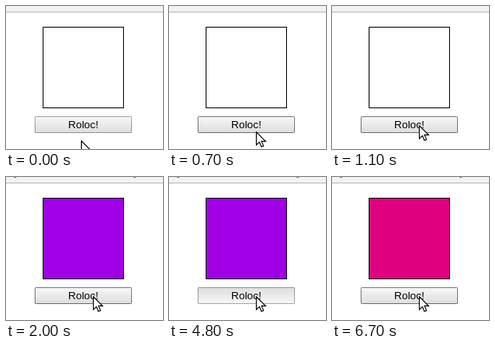
Write an HTML page that moves like this. It is 197 px wide and 179 px high and loops after 8000 ms.

```html
<!DOCTYPE html>
<html lang="en">
<head>
<meta charset="utf-8">
<title>Roloc</title>
<style>
  html, body { margin: 0; width: 100%; height: 100%; overflow: hidden; background: #fff; }
  svg { display: block; width: 100vw; height: 100vh; }
  text { font: 13.333px "Liberation Sans", Arial, sans-serif; }
</style>
</head>
<body>
<svg viewBox="0 0 197 179">
  <defs>
    <linearGradient id="raised" x1="0" y1="0" x2="0" y2="1">
      <stop offset="0" stop-color="#f8f8f8"/>
      <stop offset="1" stop-color="#ddd"/>
    </linearGradient>
    <linearGradient id="pressed" x1="0" y1="0" x2="0" y2="1">
      <stop offset="0" stop-color="#ddd"/>
      <stop offset="1" stop-color="#f8f8f8"/>
    </linearGradient>
  </defs>
  <rect width="197" height="179" fill="#fff"/>
  <rect width="197" height="7" fill="#f2f2f2"/>
  <rect y="7" width="197" height="1" fill="#b6b6b6"/>
  <path id="marks" d="M10 0h3v1h-3zM160 0h3v1h-3z" fill="#3a7fc4"/>
  <rect id="box" x="46.5" y="26.5" width="101" height="101" stroke="#000"/>
  <rect id="face" x="36" y="138" width="122" height="21" rx="1"/>
  <rect id="edge" x="36.5" y="138.5" width="121" height="20" rx="1" fill="none" stroke="#000"/>
  <text x="97" y="153" text-anchor="middle">Roloc!</text>
  <path id="cursor" d="M.6 .9V17L4.5 13.4L7 19.2L9.6 18.1L7.1 12.4H12.2Z"
        fill="#fff" stroke="#000" stroke-width="1.15"/>
</svg>
<script>
  const LOOP = 8000, STEP = 100;
  const $ = id => document.getElementById(id);
  const [marks, box, face, edge, cursor] =
    ['marks', 'box', 'face', 'edge', 'cursor'].map($);

  const fills = [[6700, '#df007f'], [4900, '#f8ff00'], [2000, '#a000e6'], [0, '#fff']];
  const presses = [1900, 4800];

  const progress = (t, from, to) => Math.min(1, Math.max(0, (t - from) / (to - from)));

  function cursorAt(t) {
    const p = progress(t, 0, 500), approach = p * (2 - p);
    const climb = progress(t, 600, 1100);
    const enter = t >= 700 ? 2 + 8 * progress(t, 700, 1100) : 2 * climb;
    return [94 + Math.round(15 * approach), Math.round(168 - 9 * approach - enter)];
  }

  function draw(time) {
    const t = Math.floor((time % LOOP) / STEP) * STEP;
    const down = presses.some(at => t >= at && t < at + STEP);
    const [x, y] = cursorAt(t);
    box.setAttribute('fill', fills.find(([at]) => t >= at)[1]);
    face.setAttribute('fill', down ? 'url(#pressed)' : 'url(#raised)');
    edge.setAttribute('stroke-opacity', t >= 700 && !down ? 0.5 : 0.333);
    marks.setAttribute('visibility', t >= 1900 ? 'visible' : 'hidden');
    cursor.setAttribute('transform', `translate(${x} ${y})`);
  }

  const start = performance.now();
  function tick() {
    draw(performance.now() - start);
    requestAnimationFrame(tick);
  }
  tick();
</script>
</body>
</html>
```
